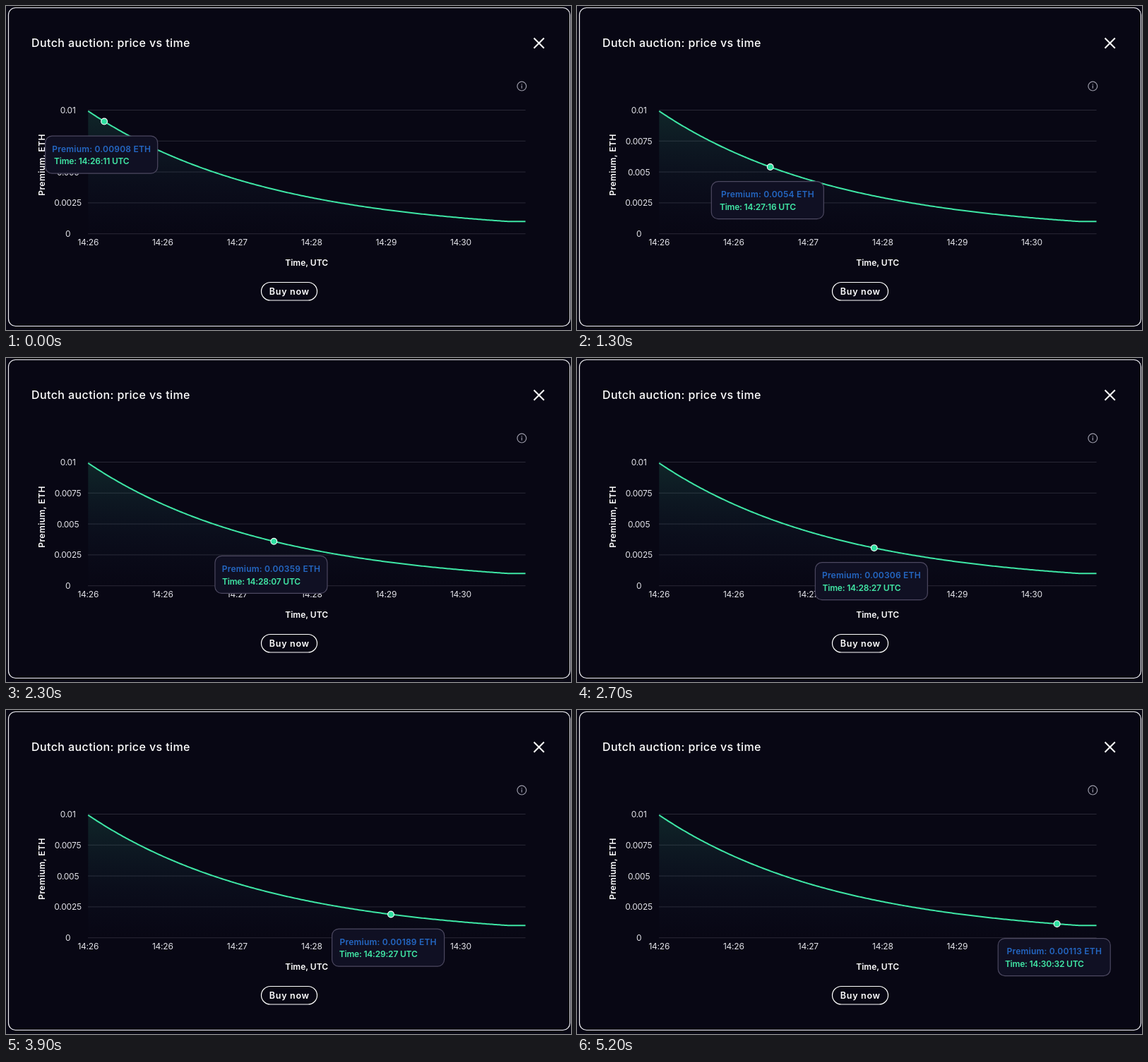
Write an HTML page that moves like this. It is 800 by 459 pixels and loops after 5.3 s.

```html
<!DOCTYPE html>
<html lang="en">
<head>
<meta charset="utf-8">
<title>Dutch auction</title>
<style>
html, body { margin: 0; width: 100%; height: 100%; overflow: hidden; background: #080714; }
svg { display: block; width: 100vw; height: 100vh; }
text { font-family: Inter, Roboto, sans-serif; font-size: 12px; fill: #fff; }
.mid { text-anchor: middle; }
.axis text { fill: #e4e4ea; letter-spacing: -.25px; text-anchor: middle; }
.bold { font-weight: 600; }
</style>
</head>
<body>
<svg viewBox="0 0 800 459" fill="none">
  <defs>
    <linearGradient id="fade" x1="0" y1="148" x2="0" y2="323" gradientUnits="userSpaceOnUse">
      <stop offset="0" stop-color="#3ee6a5" stop-opacity=".14"/>
      <stop offset=".6" stop-color="#3c8ca5" stop-opacity=".05"/>
      <stop offset="1" stop-color="#3c64a5" stop-opacity="0"/>
    </linearGradient>
  </defs>
  <rect width="800" height="459" fill="#080714"/>
  <rect x="3.5" y="2.5" width="795" height="451" rx="10" stroke="#f0f0f4" stroke-width="1.2"/>
  <text x="36" y="58" style="font-size:16px;font-weight:500;letter-spacing:.4px">Dutch auction: price vs time</text>
  <path d="M747.5 45.5l14.3 14.3m0-14.3l-14.3 14.3" stroke="#fff" stroke-width="2"/>
  <g stroke="#9a9aa8">
    <circle cx="730.3" cy="113.6" r="6.4" stroke-width="1.2"/>
    <path d="M730.3 112.6v4.2M730.3 110.2v1.3" stroke-width="1.2"/>
  </g>
  <g id="axes" class="axis"></g>
  <text class="mid bold" transform="translate(55.4 225) rotate(-90)" letter-spacing=".45">Premium, ETH</text>
  <text class="mid bold" x="425.7" y="367.6">Time, UTC</text>
  <path id="area" fill="url(#fade)"/>
  <path id="line" stroke="#3ee6a5" stroke-width="2"/>
  <rect x="361.5" y="391.5" width="79" height="25.5" rx="12.75" stroke="#fff" stroke-width="1.2"/>
  <text class="mid bold" x="401.3" y="408.5" style="font-size:12.5px;letter-spacing:.7px">Buy now</text>
  <circle id="dot" r="4.4" fill="#2fe0a0" stroke="#fff" stroke-width="1.1"/>
  <g id="tip">
    <rect width="159" height="53" rx="9.5" fill="#101023" stroke="#4c4860" stroke-width="1.2"/>
    <text id="price" class="mid bold" x="79.6" y="22.4" style="fill:#2467c3;letter-spacing:.22px"></text>
    <text id="clock" class="mid bold" x="65.6" y="40.2" style="fill:#41e8a6;letter-spacing:-.2px"></text>
  </g>
</svg>
<script>
const $ = id => document.getElementById(id);
const LOOP = 5300, STEP = 100;
const LEFT = 116.3, RIGHT = 735.6, BASE = 322.7, SCALE = 17520, PX_PER_SEC = 2.071;

const premium = s => Math.max(.001, .01 * Math.exp(-.008 * (s + 1)));
const xAt = s => LEFT + s * PX_PER_SEC;
const yAt = p => BASE - p * SCALE;
const pad = n => String(n).padStart(2, '0');

function drawChart() {
  let out = '';
  for (const p of [0, .0025, .005, .0075, .01]) {
    const y = yAt(p);
    out += `<path d="M116 ${y}H735.6" stroke="#292836"/><text x="87.6" y="${y + 4.4}">${p}</text>`;
  }
  ['14:26', '14:26', '14:27', '14:28', '14:29', '14:30'].forEach((label, i) => {
    out += `<text x="${116.3 + i * 105.5}" y="339.2">${label}</text>`;
  });
  $('axes').innerHTML = out;

  const pts = [];
  for (let s = 0; s <= 299; s++) pts.push(xAt(s).toFixed(2) + ' ' + yAt(premium(s)).toFixed(2));
  const d = 'M' + pts.join('L');
  $('line').setAttribute('d', d);
  $('area').setAttribute('d', `${d}V${BASE}H${LEFT}Z`);
}

function render(ms) {
  const k = Math.floor((ms % LOOP) / STEP);
  const s = 11 + 5 * k + (k > 15 ? 1 : 0);
  const p = premium(s), x = xAt(s), y = yAt(p);
  $('dot').setAttribute('cx', x);
  $('dot').setAttribute('cy', y);
  $('tip').setAttribute('transform', `translate(${x - 83.4} ${y + 20.6})`);
  $('price').textContent = `Premium: ${+p.toFixed(5)} ETH`;
  $('clock').textContent = `Time: 14:${26 + Math.floor(s / 60)}:${pad(s % 60)} UTC`;
}

drawChart();
render(0);
const start = performance.now();
function tick() {
  render(performance.now() - start);
  requestAnimationFrame(tick);
}
requestAnimationFrame(tick);
</script>
</body>
</html>
```
